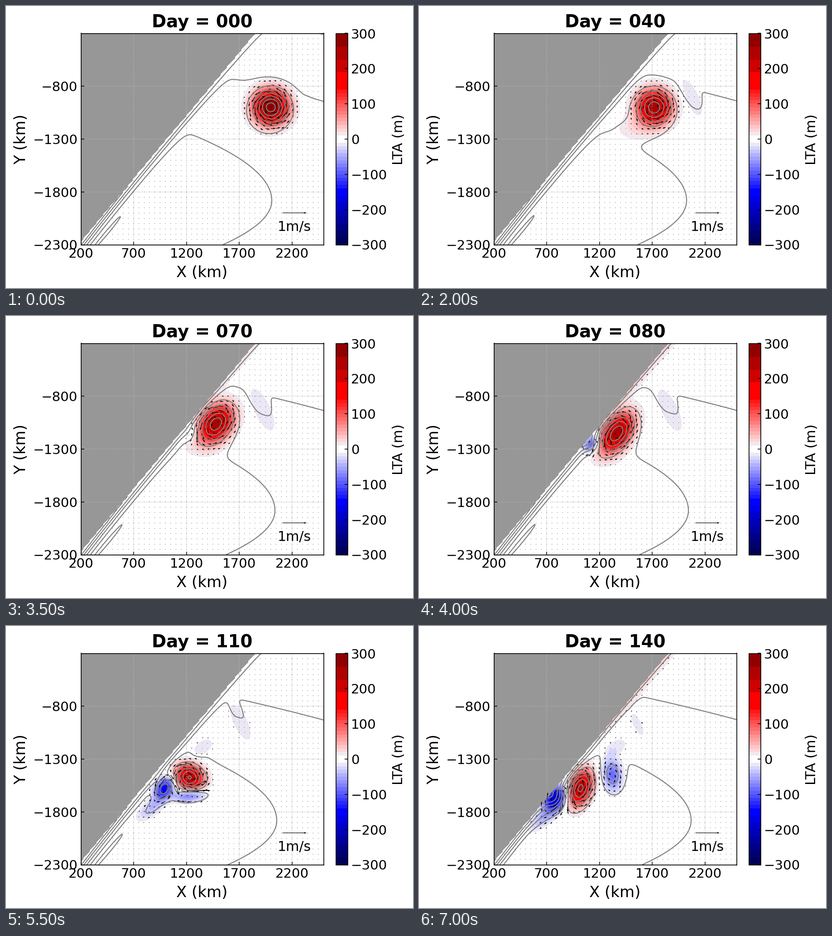
A matplotlib script that plays this animation: 899 px wide and 623 px high, repeating every 7500 ms.

```python
import numpy as np
import matplotlib.pyplot as plt
from matplotlib.animation import FuncAnimation
from matplotlib.cm import ScalarMappable
from matplotlib.colors import BoundaryNorm, ListedColormap

W, H, DPI = 899, 623, 128
PT = 72 / DPI                                   # points per pixel
LEFT, RIGHT, TOP, BOTTOM = 165.5, 701.5, 60.5, 527.5
FRAMES, INTERVAL = 15, 500

plt.rcParams["font.family"] = "DejaVu Sans"

# Ocean grid in km, and the same grid in stage pixels
xs = np.linspace(200, 2500, 185)
ys = np.linspace(-2300, -300, 161)
X, Y = np.meshgrid(xs, ys)
PX = LEFT + (X - 200) * (RIGHT - LEFT) / 2300
PY = TOP + (-300 - Y) * (BOTTOM - TOP) / 2000

# Distance off the coast and along it
off = 0.766 * (X - 200) - 0.643 * (Y + 2265)
along = 0.643 * (X - 200) + 0.766 * (Y + 2265)
land = off < 0
sea = np.maximum(off, 0)


def ramp(day, start, end):
    t = np.clip((day - start) / (end - start), 0, 1)
    return t * t * (3 - 2 * t)


def blob(cx, cy, a, b, tilt, height, power=1):
    """Tilted bell in stage pixels; a higher power gives a flatter top."""
    c, s = np.cos(np.radians(tilt)), np.sin(np.radians(tilt))
    dx, dy = PX - cx, cy - PY
    r2 = ((dx * c + dy * s) / a) ** 2 + ((dy * c - dx * s) / b) ** 2
    return height * np.exp(-r2 ** power)


def squeeze(day):
    """The eddy is pressed against the coast every 60 days."""
    return ramp(day, 45, 75) * (0.35 - 0.65 * np.cos(2 * np.pi * (day - 50) / 60))


def eddy_center(day):
    x = 585 - 1.63 * day - 18 * np.exp(-((day - 82) / 12) ** 2)
    return x, 223 + 135 * ramp(day, 55, 130)


def eddy(day):
    x, y = eddy_center(day)
    p, r = squeeze(day), 35 - 7 * ramp(day, 75, 110)
    core = blob(x, y, r * (1 + 0.33 * p), r * (1 - 0.21 * p),
                35 + 0.25 * day, 240 + 70 * np.exp(-day / 30))
    skirt = 24 * np.exp(-((day - 50) / 27) ** 2)
    return core + blob(x - 38, y + 46, 44, 27, 5, skirt)


def wake(day):
    a = 30 + 34 * np.sin(np.pi * day / 145)
    return blob(650 - 1.2 * day, 196 + 0.15 * day, a, 0.36 * a, -65,
                -15 * ramp(day, -10, 45), 2)


def lows(day):
    """Cyclones spun off beside the coast and around the eddy."""
    x, y = eddy_center(day)
    cx, cy = x - 56, y + 24
    a = 10 + 0.14 * day
    coast = blob(cx, cy, a, 0.7 * a, 55, -1.35 * day * ramp(day, 62, 82))

    late = day - 110
    turn = np.radians(3.75 * late - 90)
    reach = 40 + 1.2 * max(late, 0)
    grown = ramp(day, 85, 112)
    south = blob(x + reach * np.cos(turn), y - reach * np.sin(turn),
                 34, 14 + 0.2 * max(late, 0), 5 + 3 * late, -88 * grown)
    tail = blob(cx - 28, cy + 43, 36, 16, 40, -42 * grown)
    north = blob(435, 268, 28, 17, 35, -16 * grown, 2)
    return coast + south + tail + north


def coastal_wave(day):
    height = 5 * ramp(day, 40, 60) + 19 * max(squeeze(day), 0)
    start = 1800 - 5 * (day - 80)
    return height * np.exp(-(sea / 58) ** 2) / (1 + np.exp((start - along) / 80))


def anomaly(day):
    return eddy(day) + wake(day) + lows(day) + coastal_wave(day)


def background(day):
    """Gyre interior plus the boundary current along the coast."""
    bend = np.where(Y > -1882, 0.00194, 0.00266)
    u = 2009 + 60 * day / 140 - X - bend * (Y + 1882) ** 2
    gyre = 0.02545 * u + 1.24e-6 * u ** 2
    f = np.clip(along / 2566, 0, 1)
    current = (240 - 185 * f) * np.exp(-(sea / (65 * (1 - 0.5 * f))) ** 1.5)
    height = 34 * (1 - 0.3 * ramp(day, 112, 140))
    crest = height * np.exp(-((sea - 130) / 35) ** 2 - (along / 580) ** 2)
    return gyre - current + crest


def band_color(lo, hi):
    mid = (lo + hi) / 2
    if lo == -10:
        return "white"
    if abs(mid) == 15:
        return (0.95, 0.91, 0.935) if mid > 0 else (0.925, 0.905, 0.96)
    return plt.cm.seismic((min(mid, 150) if lo == 140 else mid) / 600 + 0.5)


bands = [*range(-300, -140, 20), *range(-140, 0, 10),
         *range(10, 150, 10), 190, 225, 262, 300]
cmap = ListedColormap([band_color(*pair) for pair in zip(bands, bands[1:])])
norm = BoundaryNorm(bands, cmap.N)

fig = plt.figure(figsize=(W / DPI, H / DPI), dpi=DPI, facecolor="white")


def box(x0, x1):
    return fig.add_axes([x0 / W, 1 - BOTTOM / H, (x1 - x0) / W, (BOTTOM - TOP) / H])


def label(x, y, text, size, **kw):
    return fig.text(x / W, 1 - y / H, text, fontsize=size * PT, ha="center",
                    va="baseline", rotation_mode="anchor", **kw)


def style(axes):
    axes.tick_params(direction="in", length=6.8 * PT, width=1.56 * PT,
                     pad=6.8 * PT, labelsize=29.2 * PT)


ax = box(LEFT, RIGHT)
ax.set_facecolor("#979797")
ax.set_xlim(200, 2500)
ax.set_ylim(-2300, -300)
ax.set_xticks(range(200, 2500, 500))
ax.set_yticks(range(-2300, -300, 500))
ax.grid(color="#b8b8b8", linestyle=":", linewidth=1.5 * PT)
style(ax)
for spine in ax.spines.values():
    spine.set_linewidth(1.7 * PT)

cax = box(729, 755)
bar = fig.colorbar(ScalarMappable(norm, cmap), cax=cax, spacing="proportional",
                   ticks=range(-300, 301, 100))
bar.minorticks_off()
bar.outline.set_linewidth(1.7 * PT)
style(cax)

title = label(433.5, 47, "", 38.8, weight="bold")
label(433, 599, "X (km)", 34)
label(43, 294, "Y (km)", 34, rotation=90)
label(875.5, 295, "LTA (m)", 30.3, rotation=90)
label(637, 497, "1m/s", 30)

step = (slice(None, None, 4), slice(None, None, 4))
wet = off[step] > 12
arrows = ax.quiver(X[step][wet], Y[step][wet], np.zeros(wet.sum()),
                   np.zeros(wet.sum()), scale=10, width=0.0022, zorder=1.2)
ax.quiverkey(arrows, 637.5 / W, 1 - 457 / H, 1, "", coordinates="figure")

drawn = []


def update(i):
    while drawn:
        drawn.pop().remove()
    day = 10 * i
    lta = anomaly(day)
    total = np.ma.array(background(day) + lta, mask=land)
    shade = np.ma.array(np.clip(lta, -299, 299), mask=land)
    drawn.append(ax.contourf(X, Y, shade, levels=bands, cmap=cmap, norm=norm))
    drawn.append(ax.contour(X, Y, total, levels=range(-350, 451, 50),
                            colors="#808080", linestyles="solid",
                            linewidths=2.2 * PT))
    dy, dx = np.gradient(lta, ys, xs)
    arrows.set_UVC(0.23 * dy[step][wet], -0.23 * dx[step][wet])
    title.set_text(f"Day = {day:03d}")
    return []


anim = FuncAnimation(fig, update, frames=FRAMES, interval=INTERVAL,
                     init_func=lambda: [], repeat=True, repeat_delay=0)
plt.show()
```
